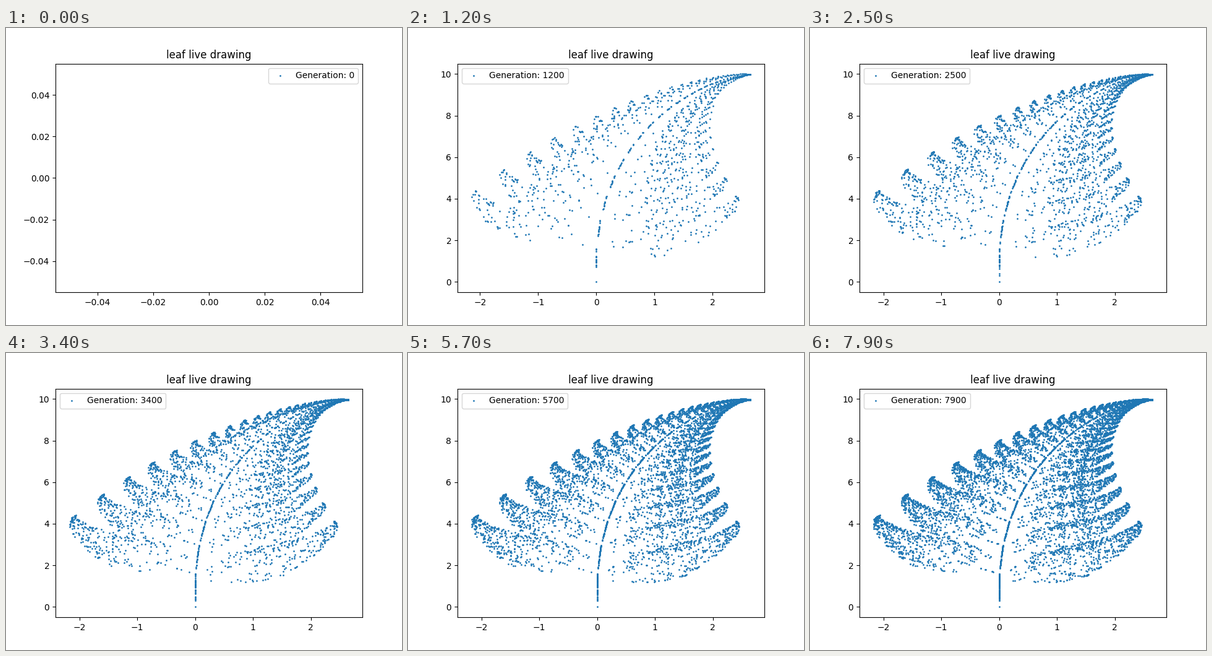
Animation of 640 by 480 pixels, one loop 8000 ms. Source, as a matplotlib script:

```python
import random

import matplotlib.pyplot as plt
import numpy as np
from matplotlib.animation import FuncAnimation

FRAMES = 80
STEP = 100  # new points per frame


# The four affine maps of the fern
def stem(x, y):
    return 0, 0.16 * y


def shrink(x, y):
    return 0.85 * x + 0.04 * y, -0.04 * x + 0.85 * y + 1.6


def left_leaf(x, y):
    return 0.2 * x - 0.26 * y, 0.23 * x + 0.22 * y + 1.6


def right_leaf(x, y):
    return -0.15 * x + 0.28 * y, 0.26 * x + 0.24 * y + 1.04


def fern(count, seed=7):
    rng = random.Random(seed)
    maps = rng.choices([stem, shrink, left_leaf, right_leaf],
                       [1, 85, 7, 7], k=count - 1)
    points = [(0, 0)]
    for step in maps:
        points.append(step(*points[-1]))
    return np.array(points)


def padded(values, margin=0.05):
    lo, hi = (values.min(), values.max()) if len(values) else (-0.05, 0.05)
    pad = margin * (hi - lo)
    return lo - pad, hi + pad


points = fern(FRAMES * STEP)
fig, ax = plt.subplots(figsize=(6.4, 4.8), dpi=100)
ax.set_title("leaf live drawing")
dots = ax.scatter([], [], s=1)


def draw(n):
    pts = points[:n * STEP]
    dots.set_offsets(pts)
    dots.set_label(f"Generation: {n * STEP}")
    ax.set_xlim(padded(pts[:, 0]))
    ax.set_ylim(padded(pts[:, 1]))
    ax.legend(loc="upper left" if n else "upper right")
    return (dots,)


anim = FuncAnimation(fig, draw, frames=FRAMES, interval=100,
                     init_func=lambda: draw(0), repeat=True, repeat_delay=0)
plt.show()
```
